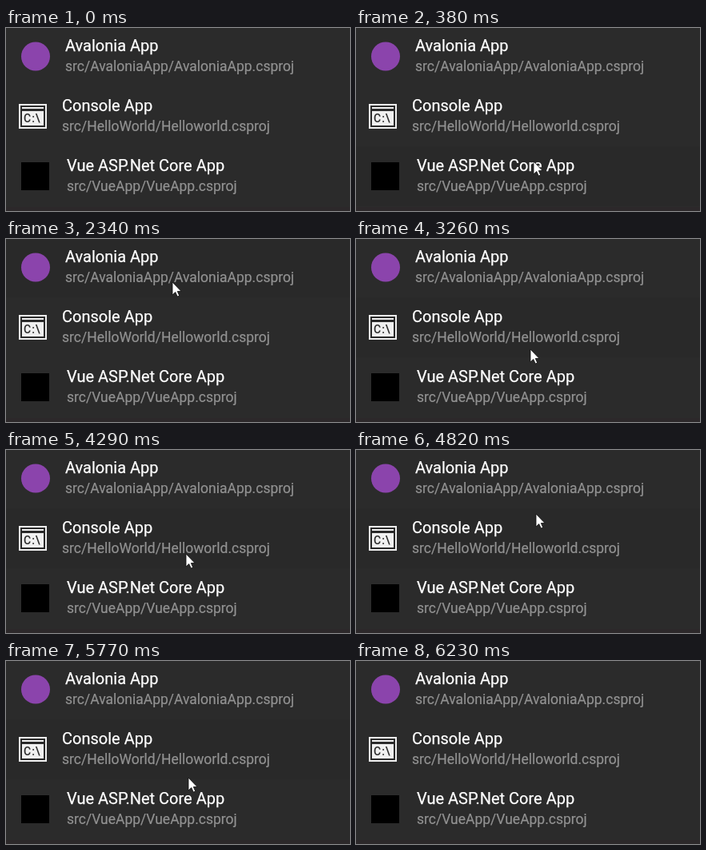
Recreate the animation shown at these times as an HTML page. Size 430 px wide and 229 px high, loop 6940 ms.

```html
<!DOCTYPE html>
<html lang="en">
<head>
<meta charset="utf-8">
<title>Project list</title>
<style>
  html, body { margin: 0; width: 100%; height: 100%; overflow: hidden; background: #2b2b2b; }
  svg { display: block; width: 430px; height: 229px; }
  text { font-family: Roboto, sans-serif; }
  .title { font-size: 20px; fill: #fff; stroke: #fff; stroke-width: .25px; }
  .path { font-size: 17.5px; fill: #929292; stroke: #929292; stroke-width: .2px; }
  .prompt { font-size: 14px; font-weight: 500; letter-spacing: 1px; fill: #2b2b2b; }
</style>
</head>
<body>
<svg viewBox="0 0 430 229">
  <rect width="430" height="229" fill="#2b2b2b"/>
  <rect id="hover" width="430" height="75" fill="#292929"/>
  <rect y="224" width="430" height="5" fill="#2c282a"/>

  <circle cx="37" cy="35.5" r="18" fill="#8b44ac"/>
  <g fill="#f0f0f0">
    <path d="M17 96h33v29H17z" fill="none" stroke="#f0f0f0" stroke-width="2"/>
    <path d="M20 99h27v2H20zM20 104h27v18H20z"/>
    <text class="prompt" x="22" y="118">C:\</text>
  </g>
  <rect x="19" y="168" width="35" height="35" fill="#000"/>

  <g id="rows"></g>

  <g id="cursor">
    <path d="M0 0V16L3.7 12.5L6.3 18L8.7 17L6.3 11.5H11Z" fill="#fff" stroke="#111" stroke-width=".8"/>
    <circle id="click" r="15" fill="#ff0" fill-opacity=".47"/>
  </g>
</svg>
<script>
  const LOOP = 6940, SHOW = 160, HIDE = 6230, ROW = 75, BOTTOM = 224;
  const rows = [
    { x: 74, title: 'Avalonia App', path: 'src/AvaloniaApp/AvaloniaApp.csproj' },
    { x: 70, title: 'Console App', path: 'src/HelloWorld/Helloworld.csproj' },
    { x: 76, title: 'Vue ASP.Net Core App', path: 'src/VueApp/VueApp.csproj' }
  ];
  // Each move leads straight, or bowed sideways, from the last place to x, y.
  const home = { x: 255, y: 173 };
  const moves = [
    { from: 290, to: 380, x: 222, y: 167 },
    { from: 1310, to: 1530, x: 214, y: 126 },
    { from: 1850, to: 2340, x: 208, y: 54 },
    { from: 2620, to: 3260, x: 218, y: 138 },
    { from: 3380, to: 3610, x: 231, y: 190 },
    { from: 3920, to: 4290, x: 225, y: 130 },
    { from: 4290, to: 4460, x: 207, y: 73 },
    { from: 4460, to: 4640, x: 227, y: 88 },
    { from: 4780, to: 5080, x: 209, y: 27 },
    { from: 5165, to: 5870, x: 223, y: 166, bow: 14 },
    { from: 6080, to: 6230, x: 249, y: 215 }
  ];
  const clicks = [{ from: 920, to: 1120 }, { from: 5970, to: 6060 }];

  const find = id => document.getElementById(id);
  const hover = find('hover'), cursor = find('cursor'), click = find('click');
  const show = (el, on) => el.setAttribute('visibility', on ? 'visible' : 'hidden');

  find('rows').innerHTML = rows.map(({ x, title, path }, i) => `
    <text class="title" x="${x}" y="${29 + i * ROW}">${title}</text>
    <text class="path" x="${x}" y="${54 + i * ROW}">${path}</text>`).join('');

  function pointer(t) {
    let { x, y } = home;
    for (const m of moves) {
      if (t < m.from) break;
      const u = Math.min(1, (t - m.from) / (m.to - m.from));
      x += (m.x - x) * u + 4 * (m.bow || 0) * u * (1 - u);
      y += (m.y - y) * u;
    }
    return { x: Math.round(x), y: Math.round(y) };
  }

  function draw() {
    const t = performance.now() % LOOP;
    const visible = t >= SHOW && t < HIDE;
    const { x, y } = pointer(t);
    cursor.setAttribute('transform', `translate(${x} ${y})`);
    hover.setAttribute('y', Math.floor((y + 2) / ROW) * ROW - 2);
    show(cursor, visible);
    show(hover, visible && y < BOTTOM);
    show(click, clicks.some(c => t >= c.from && t < c.to));
    requestAnimationFrame(draw);
  }
  draw();
</script>
</body>
</html>
```
